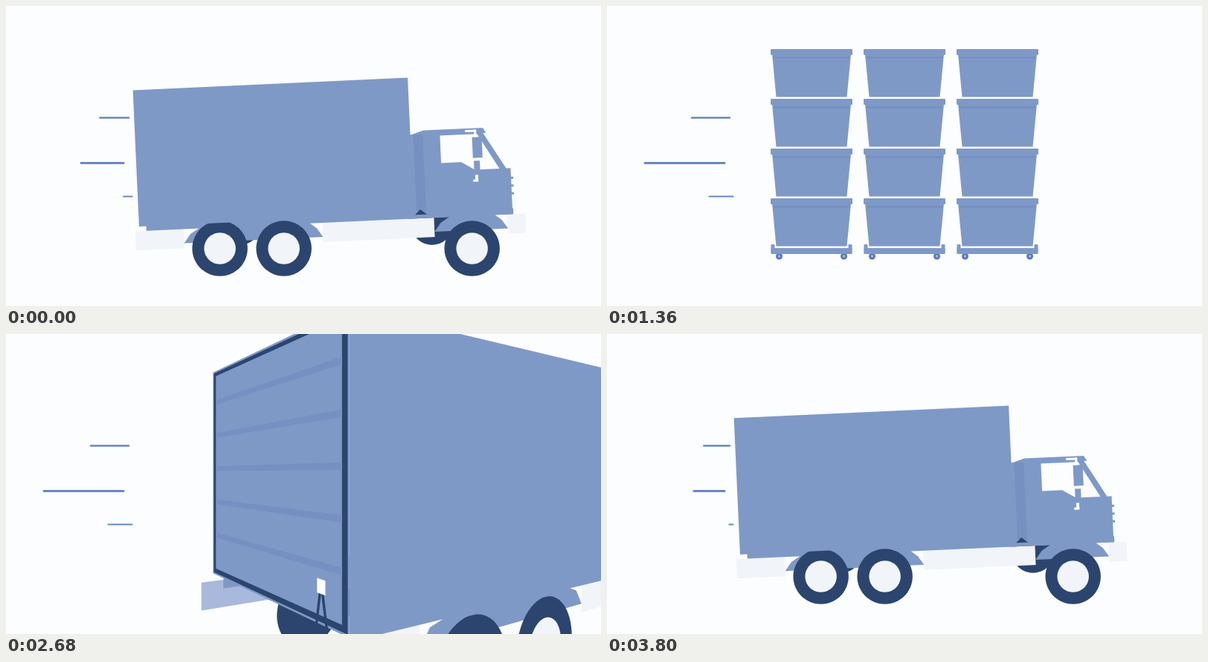
Animation, 800 px wide and 404 px high, one loop 3840 ms. Source, as an HTML page with a canvas:

```html
<!DOCTYPE html>
<html lang="en">
<head>
<meta charset="utf-8">
<title>Moving truck</title>
<style>
html, body { margin: 0; width: 100%; height: 100%; overflow: hidden; background: #fcfdff; }
canvas { display: block; }
</style>
</head>
<body>
<canvas id="stage" width="800" height="404"></canvas>
<script>
const ctx = document.getElementById('stage').getContext('2d');
const LOOP = 3840, DRIVE_END = 1150, TURN_START = 2240;
const PAPER = '#fcfdff', BLUE = '#7f99c7', SHADE = '#7690c2', NAVY = '#2c456e', PALE = '#f1f4f9', FAR_PALE = '#a9b9dc';

// The cargo box is 1 unit (181 px in side view) high; the eye sits at (400, 187).
const UNIT = 181, FOCAL = 635, LENGTH = 2.011, WIDTH = 1.094, EYE_Y = 187;

// Side-view pixels
const BOX_LEFT = 199, BOX_BOTTOM = 278, AXLES = [302, 388, 641], ARCHES = [[253, 440], [590, 689]];

const clamp = v => Math.min(1, Math.max(0, v));
const phase = (t, from, to) => clamp((t - from) / (to - from));
const inOut = (u, n = 3) => u < .5 ? (2 * u) ** n / 2 : 1 - (2 - 2 * u) ** n / 2;

let pose;

function poseAt(t) {
  const driving = t < DRIVE_END;
  const turn = driving ? Math.PI / 2 : inOut(phase(t, TURN_START, 3040)) * Math.PI / 2;
  const pan = driving ? 1 : inOut(phase(t, 2408, 3476), 2);
  const recede = driving ? 1 : inOut(phase(t, 2246, 3400));
  const pull = .227 * inOut(phase(t, 1380, 2100));
  const drive = driving ? 135.5 * (t / 400) ** 2.5 : 0;
  return {
    driving, pull, drive,
    sin: Math.sin(turn),
    cos: Math.cos(turn),
    x: LENGTH / 2 * Math.sin(turn) - 1.19 * pan + drive / UNIT,
    z: 1.758 + (driving ? .227 : pull) + 2.07 * recede,
    tilt: driving ? Math.max(0, 1 - .3 * (t / 400) ** 2) : inOut(phase(t, 3400, LOOP)),
    shut: driving ? 1 : inOut(phase(t, 1720, TURN_START))
  };
}

// s: along the truck from the rear, y: down from eye level, w: across from the near side
function project(s, y, w) {
  const a = s - LENGTH / 2, b = w - WIDTH / 2;
  const k = FOCAL / (pose.z + a * pose.cos + b * pose.sin);
  return [400 + (pose.x + a * pose.sin - b * pose.cos) * k, EYE_Y + y * k, k];
}

function fill(points, color) {
  ctx.beginPath();
  for (const [x, y] of points) ctx.lineTo(x, y);
  ctx.closePath();
  ctx.fillStyle = color;
  ctx.fill();
}

function disc(x, y, r, color) {
  ctx.beginPath();
  ctx.arc(x, y, r, 0, 2 * Math.PI);
  ctx.fillStyle = color;
  ctx.fill();
}

// The undercarriage tucks up on the near side while the truck is seen from behind
function sidePoint(x, y, w) {
  const tuck = .08 * pose.cos * clamp((y - BOX_BOTTOM) / 12) * (1 - w / WIDTH);
  return project((x - BOX_LEFT) / UNIT, (y - 187.5) / UNIT - tuck, w);
}

// The sprung body leans back as the truck sets off
function body(points, color, w = 0) {
  const lean = -.0454 * pose.tilt, c = Math.cos(lean), n = Math.sin(lean);
  fill(points.map(([x, y]) =>
    sidePoint(625 + (x - 625) * c - (y - 290) * n, 290 + (x - 625) * n + (y - 290) * c, w)), color);
}

const rect = (x0, y0, x1, y1) => [[x0, y0], [x1, y0], [x1, y1], [x0, y1]];

function wheel(x, w) {
  const ring = (r, color) => fill(Array.from({ length: 60 }, (_, i) => {
    const a = i * Math.PI / 30;
    return sidePoint(x + r * Math.cos(a), 327 + r * Math.sin(a), w);
  }), color);
  ring(37.2, NAVY);
  if (!w) ring(21.2, PALE);
}

function cab() {
  body([[555, 171], [565, 171], [581, 166], [661, 166], [665, 173], [661, 173], [690, 222], [696, 222], [696, 284], [555, 284]], BLUE);
  body(rect(567, 171, 580, 275), SHADE);
  for (let y = 235; y < 260; y += 10.5) body(rect(695, y - 1.5, 699, y + 1.5), BLUE);
  body([[603, 174], [653, 174], [681, 222], [648, 222], [630, 211], [603, 211]], PAPER);
  // Mirrors and their brackets
  body(rect(646, 178, 659, 206), BLUE);
  body(rect(647, 210, 655, 230), BLUE);
  body(rect(637, 168, 652, 171), PAPER);
  body(rect(649, 168, 652, 178), PAPER);
  body(rect(648, 229, 652, 238), PAPER);
  body(rect(645, 235, 652, 238), PAPER);
}

function truck() {
  body(rect(188, 285, 713, 310), FAR_PALE, WIDTH);
  body(rect(209, 277, 697, 293), BLUE, WIDTH);
  AXLES.forEach(x => wheel(x, WIDTH));

  const edges = [188, ...ARCHES.flat(), 713];
  for (let i = 0; i < edges.length; i += 2) body(rect(edges[i], 284, edges[i + 1], 310), PALE);
  body(rect(203, 276, 697, 284), BLUE);
  for (const [a, b] of ARCHES)
    body([[a, 303], [a + 9, 291], [a + 22, 283], [b - 18, 283], [b - 8, 291], [b, 303]], BLUE);
  AXLES.forEach(x => wheel(x, 0));

  cab();
  const grow = 1 + .016 * pose.tilt;
  body(rect(BOX_LEFT, 97, 563, BOX_BOTTOM).map(([x, y]) =>
    [547 + (x - 547) * grow, BOX_BOTTOM + (y - BOX_BOTTOM) * grow]), BLUE);
  body([[565, 279], [572, 279 - 7 * pose.tilt ** 2], [581, 279]], NAVY);
}

function rear() {
  const at = (w, y) => project(0, y, w);
  if (at(0, 0)[0] <= at(WIDTH, 0)[0]) return;
  const panel = (inset, top, bottom) =>
    [at(WIDTH - inset, top), at(inset, top), at(inset, bottom), at(WIDTH - inset, bottom)];
  const frame = (outer, inner, color) => {
    ctx.beginPath();
    for (const inset of [outer, inner]) {
      panel(inset, inset - .5, .5 - inset).forEach(([x, y], i) => i ? ctx.lineTo(x, y) : ctx.moveTo(x, y));
      ctx.closePath();
    }
    ctx.fillStyle = color;
    ctx.fill('evenodd');
  };
  frame(0, .011, BLUE);
  frame(.008, .045, NAVY);

  if (!pose.shut) return;
  const bottom = -.5 + .97 * pose.shut, top = Math.min(-.475, bottom);
  fill(panel(.037, top, bottom), BLUE);
  for (let y = bottom - .165; y > top; y -= .163) fill(panel(.037, y - .012, y + .012), SHADE);

  // Handle and strap, laid out in pixels around the shutter's lower edge
  const hang = (x, y) => at(WIDTH / 2 - (x - 400) / 654, bottom + (y - 109) / 654);
  const spot = (x, y) => hang(x, y).slice(0, 2);
  ctx.beginPath();
  ctx.moveTo(...spot(655, 62));
  ctx.lineTo(...spot(642, 130));
  ctx.bezierCurveTo(...spot(636, 167), ...spot(685, 167), ...spot(680, 130));
  ctx.lineTo(...spot(665, 62));
  ctx.strokeStyle = NAVY;
  ctx.lineWidth = .0155 * hang(660, 100)[2] * Math.max(.1, pose.cos);
  ctx.stroke();
  fill(rect(644, 31, 675.5, 62.5).map(p => spot(...p)), PAPER);
}

// Streaks trail behind the truck's centre line and lengthen towards their full size
function streak(t, right, y, length, start) {
  const age = (t > 3000 ? t - LOOP : t) - start;
  if (age <= 0) return;
  const x = right + .865 * pose.drive;
  ctx.lineWidth = 1.8 + length / 80;
  ctx.beginPath();
  ctx.moveTo(x, y);
  ctx.lineTo(x - length * (1 - Math.exp(-age / 146)), y);
  ctx.stroke();
}

function streaks(t) {
  ctx.save();
  ctx.strokeStyle = '#6a88c0';
  ctx.lineCap = 'round';
  streak(t, 165, 150.5, 51, -206);
  streak(t, 158, 211.5, 107, -110);
  streak(t, 169.5, 256.5, 32, -64);
  ctx.restore();
}

function bar(x, y, w, h) {
  ctx.beginPath();
  ctx.roundRect(x, y, w, h, 1);
  ctx.fillStyle = BLUE;
  ctx.fill();
}

function bin(y) {
  fill([[-53, y + 7], [53, y + 7], [47.5, y + 64.5], [-47.5, y + 64.5]], BLUE);
  fill(rect(-51, y + 10, 51, y + 13), SHADE);
  bar(-55, y, 110, 8);
}

function dolly() {
  for (const side of [-1, 1]) {
    disc(43.5 * side, 337, 4.5, '#5a7ab8');
    disc(43.5 * side, 337, 1.7, '#a8b8dc');
    bar(52 * side - 2.5, 321, 5, 12);
  }
  bar(-54.5, 326, 109, 8);
}

// Three stacks build up from their dollies, then shrink as the camera pulls back
function stacks(t) {
  const scale = 2.253 / (2.253 + pose.pull);
  for (let col = 0; col < 3; col++) for (let row = 0; row < 5; row++) {
    const start = 620 + col * 50 + row * 60, u = phase(t, start, start + 160);
    ctx.save();
    ctx.translate(400, 192);
    ctx.scale(scale, scale);
    ctx.translate((col - 1) * 125, -192 - 29 * (1 - u) ** 2);
    ctx.globalAlpha = clamp(u * 2);
    if (row) bin(326 - row * 67);
    else dolly();
    ctx.restore();
  }
}

function draw() {
  const t = performance.now() % LOOP;
  ctx.fillStyle = PAPER;
  ctx.fillRect(0, 0, 800, 404);
  pose = poseAt(t);
  if (t < TURN_START) stacks(t);
  if (pose.driving || t >= TURN_START) truck();
  rear();
  streaks(t);
  requestAnimationFrame(draw);
}
draw();
</script>
</body>
</html>
```
